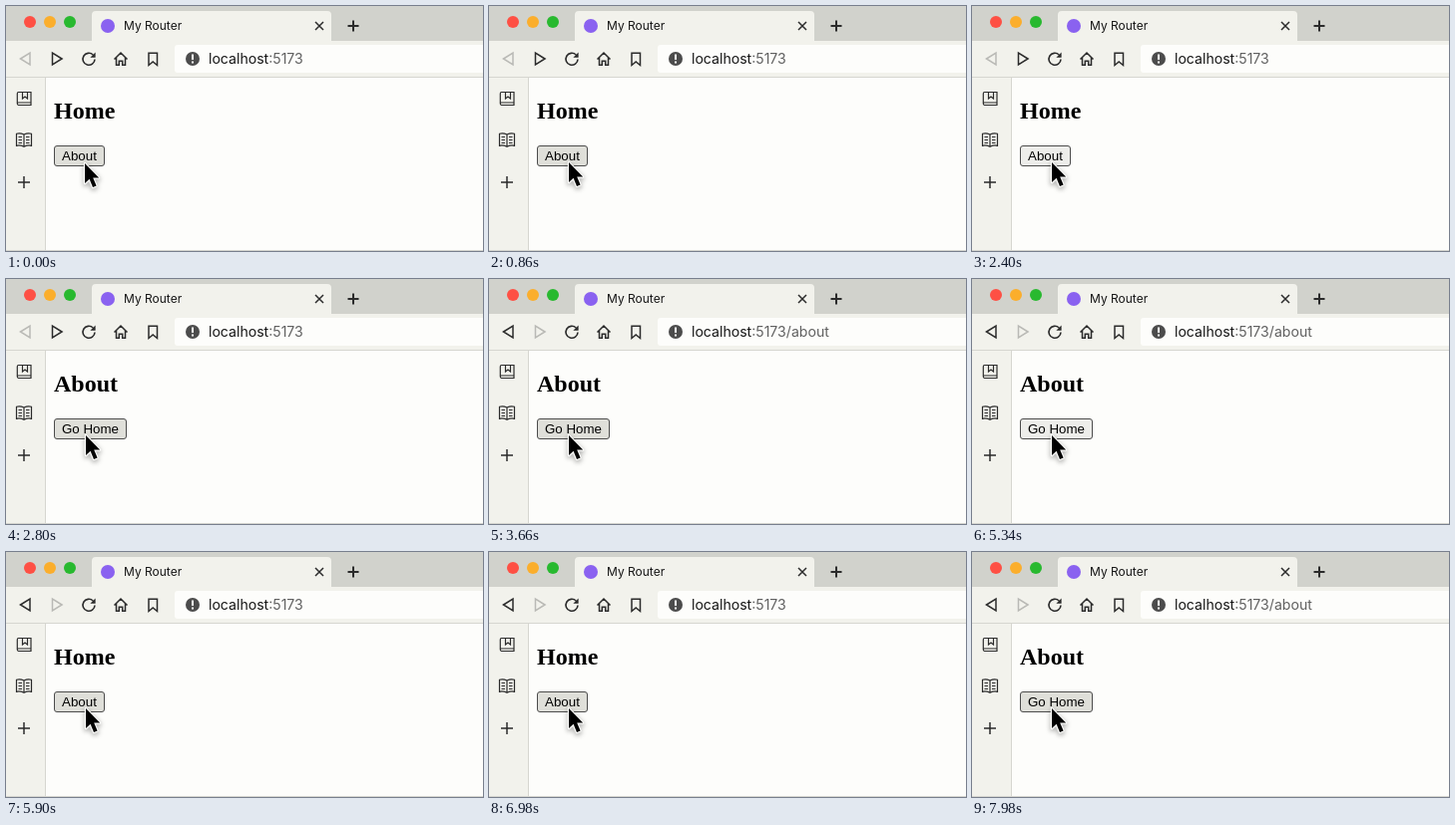
An HTML page with a canvas that plays this animation: 478x246 px, repeating every 8000 ms.

```html
<!DOCTYPE html>
<html lang="en">
<head>
<meta charset="utf-8">
<title>My Router</title>
<style>
  html, body { margin: 0; width: 100%; height: 100%; overflow: hidden; background: #fdfdfb; }
  canvas { display: block; width: 478px; height: 246px; }
</style>
</head>
<body>
<canvas id="stage" width="478" height="246"></canvas>
<script>
const ctx = document.getElementById('stage').getContext('2d');
const LOOP = 8000;
const URL_LAG = 360;
const PRESS = 100;
const CLICKS = [2500, 5400, 7520];
const UI = 'Inter, Roboto, sans-serif';
const INK = '#2b2b2b';
const FADED = '#b9b9b5';
const PAPER = '#fdfdfb';
const CHROME = '#f2f2ec';
const LINE = '#d6d6d0';

function rect(x, y, w, h, color) {
  ctx.fillStyle = color;
  ctx.fillRect(x, y, w, h);
}

function box(x, y, w, h, r, fill, stroke) {
  ctx.beginPath();
  ctx.roundRect(x, y, w, h, r);
  ctx.fillStyle = fill;
  ctx.fill();
  if (stroke) { ctx.strokeStyle = stroke; ctx.lineWidth = 1; ctx.stroke(); }
}

function dot(x, y, r, color) {
  ctx.beginPath();
  ctx.arc(x, y, r, 0, Math.PI * 2);
  ctx.fillStyle = color;
  ctx.fill();
}

function text(str, x, y, font, color) {
  ctx.font = font;
  ctx.fillStyle = color;
  ctx.fillText(str, x, y);
  return x + ctx.measureText(str).width;
}

function path(d, color = INK, width = 1.5) {
  ctx.strokeStyle = color;
  ctx.lineWidth = width;
  ctx.stroke(new Path2D(d));
}

function plus(x, y, r, width) {
  path(`M${x - r} ${y}h${2 * r}M${x} ${y - r}v${2 * r}`, INK, width);
}

function tabBar() {
  rect(0, 0, 478, 35, '#d1d2cc');
  dot(24, 16, 6, '#fe5044');
  dot(44, 16, 6, '#fbae2c');
  dot(64, 16, 6, '#28b92f');
  box(86, 5, 240, 34, [4, 4, 0, 0], CHROME);
  dot(102, 20, 7, '#8a62f0');
  text('My Router', 118, 24, '12px ' + UI, '#161616');
  path('M310 16l8 8M318 16l-8 8');
  plus(348, 20, 5.5, 2);
}

function toolbar(canBack, url) {
  rect(0, 35, 478, 36, CHROME);
  rect(0, 71, 478, 1, LINE);
  path('M14.5 53L24 47.2V58.8Z', canBack ? INK : FADED);
  path('M56 53L46.5 47.2V58.8Z', canBack ? FADED : INK);
  path('M87.2 49A6 6 0 1 0 89 53.5', INK, 1.6);
  ctx.fillStyle = INK;
  ctx.fill(new Path2D('M89.6 46.5V51.8H84.4Z'));
  path('M108.5 53.5L115 47L121.5 53.5M110.5 52V59.3H113.3V55.3H116.7V59.3H119.5V52');
  path('M143 47.2H151.5V59.5L147.2 56L143 59.5Z');

  box(169, 39, 320, 28, 3, PAPER);
  dot(187, 53, 7, '#4c4c4c');
  rect(186, 48.5, 2, 5.5, PAPER);
  rect(186, 55.5, 2, 2, PAPER);
  const font = '14.1px ' + UI;
  const x = text('localhost', 203, 58, font, '#161616');
  text(':5173' + url, x, 58, font, '#606060');
}

function sidebar() {
  rect(0, 72, 40, 174, CHROME);
  rect(39, 72, 1, 174, LINE);
  path('M12.5 86.5H25V99.5H12.5A1.8 1.8 0 0 1 11.3 98V88Q11.3 86.5 12.5 86.5M11.5 97H25M16.5 87V93L19 91L21.5 93V87', INK, 1.2);
  path('M18 129Q14 127 10.5 128.3V140.3Q14 139.3 18 141.3Q22 139.3 25.5 140.3V128.3Q22 127 18 129V141', INK, 1.2);
  path('M12.5 131.5h3.5M12.5 134.5h3.5M12.5 137.5h3.5M20 131.5h3.5M20 134.5h3.5M20 137.5h3.5', INK, 1);
  plus(18, 177, 6, 1.5);
}

function page(title, label, pressed) {
  rect(40, 72, 438, 174, PAPER);
  text(title, 48, 113.4, 'bold 24px "Liberation Serif", serif', '#000');
  const width = label === 'About' ? 51 : 73;
  box(48.5, 140.5, width - 1, 20, 2.5, pressed ? '#ededea' : '#dfdfd9', '#4c4c4c');
  text(label, 56, 155, '13.333px "Liberation Sans", sans-serif', '#000');
  rect(0, 245, 478, 1, LINE);
}

function cursor(x, y) {
  const arrow = new Path2D('M0 0V20L4.6 15.8L8 24L11.6 22.4L8.2 14.6H14.2Z');
  ctx.save();
  ctx.translate(x, y);
  ctx.shadowColor = 'rgba(0,0,0,.4)';
  ctx.shadowBlur = 5;
  ctx.shadowOffsetY = 2;
  ctx.lineJoin = 'round';
  ctx.lineWidth = 2.4;
  ctx.strokeStyle = PAPER;
  ctx.stroke(arrow);
  ctx.shadowColor = 'transparent';
  ctx.fillStyle = '#000';
  ctx.fill(arrow);
  ctx.restore();
}

function draw(now) {
  const t = now % LOOP;
  const clicksBefore = time => CLICKS.filter(c => time >= c).length;
  const onAbout = clicksBefore(t) % 2 === 1;
  const visits = clicksBefore(t - URL_LAG);
  const pressed = CLICKS.some(c => t >= c - PRESS && t < c);
  const move = Math.min(1, Math.max(0, (t - 720) / 140));

  tabBar();
  toolbar(visits > 0, visits % 2 ? '/about' : '');
  sidebar();
  page(onAbout ? 'About' : 'Home', onAbout ? 'Go Home' : 'About', pressed);
  cursor(79 + move, 158 - move);
}

const start = performance.now();
function tick() {
  draw(performance.now() - start);
  requestAnimationFrame(tick);
}
tick();
</script>
</body>
</html>
```
